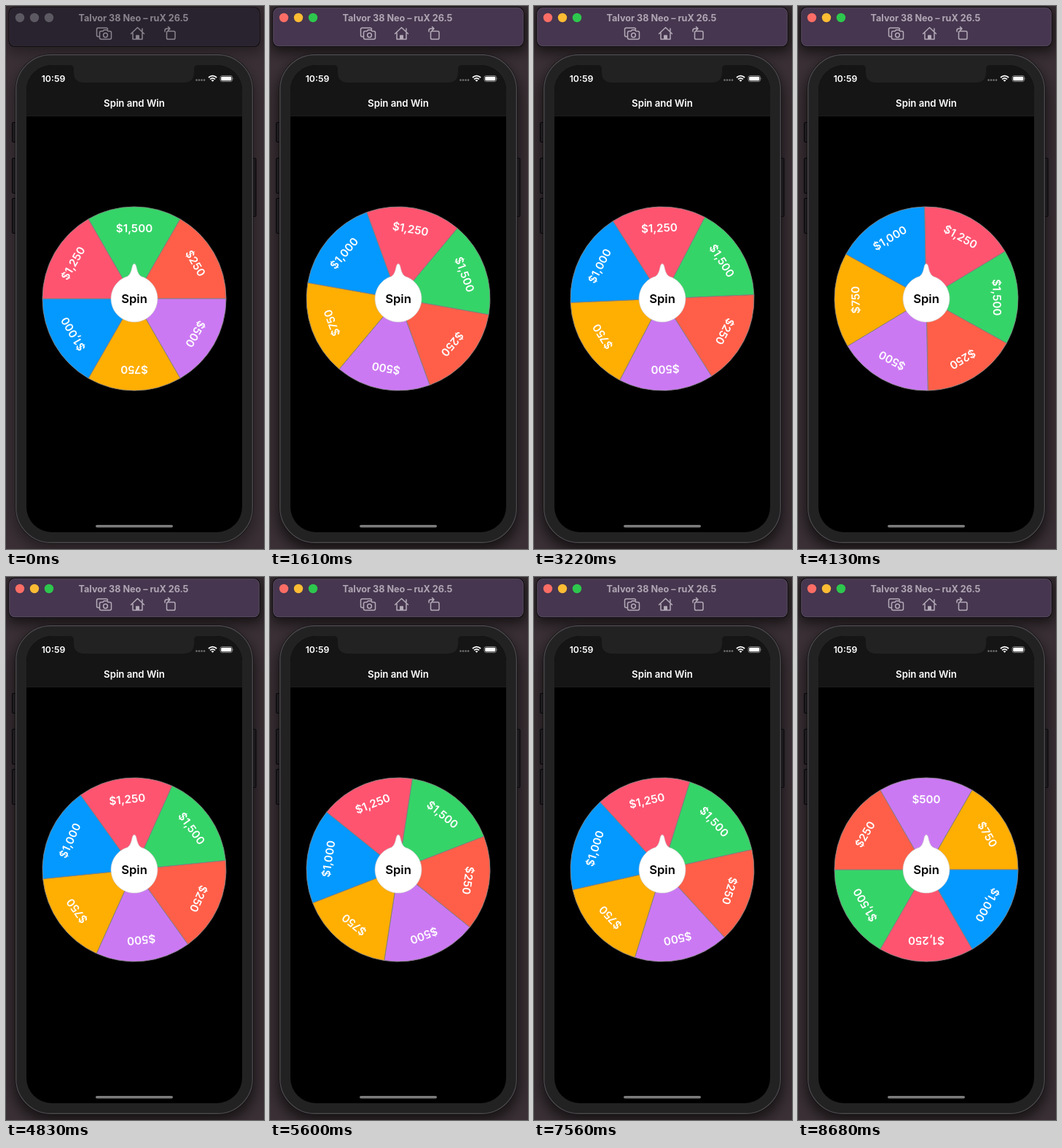
Animation, 354 px wide and 744 px high, one loop 8750 ms. Source, as an HTML page:

```html
<!DOCTYPE html>
<html lang="en">
<head>
<meta charset="utf-8">
<title>Spin and Win</title>
<style>
  html, body { margin: 0; width: 100%; height: 100%; overflow: hidden; background: #2d2529; }
  svg { display: block; width: 354px; height: 744px; font-family: Inter, Roboto, sans-serif; font-weight: 600;
        text-anchor: middle; --bar: #29232f; --edge: #39323e; --ink: #8a858e; --icon: #8a858e;
        --red: #5d5962; --amber: #5d5962; --green: #5d5962; --shade: .35; }
  svg.active { --bar: #46364f; --edge: #6b5f71; --ink: #b0a6b4; --icon: #b4abb8;
        --red: #fc6d66; --amber: #fdbc33; --green: #2dc84d; --shade: .6; }
  .bar { fill: var(--bar); stroke: var(--edge); stroke-width: .7; }
  .title { fill: var(--ink); }
  .icons { fill: none; stroke: var(--icon); stroke-width: 1.5; stroke-linejoin: round; stroke-linecap: round; }
  .shade { opacity: var(--shade); }
</style>
</head>
<body>
<svg id="stage" viewBox="0 0 354 744">
  <defs>
    <filter id="blur" x="-20%" y="-20%" width="140%" height="140%"><feGaussianBlur stdDeviation="9"/></filter>
    <clipPath id="screen"><rect x="28" y="81" width="296" height="640" rx="35"/></clipPath>
  </defs>

  <rect width="354" height="744" fill="#3a3035"/>
  <g class="shade" filter="url(#blur)">
    <rect x="2" y="2" width="350" height="62" rx="8"/>
    <rect x="10" y="74" width="332" height="672" rx="50"/>
  </g>

  <!-- simulator toolbar -->
  <rect x="3.5" y="1.5" width="345" height="54.5" rx="8" fill="#0c090d"/>
  <rect class="bar" x="4.7" y="2.7" width="342.6" height="52" rx="7"/>
  <circle cx="19" cy="16" r="6.2" fill="var(--red)"/>
  <circle cx="39" cy="16" r="6.2" fill="var(--amber)"/>
  <circle cx="59" cy="16" r="6.2" fill="var(--green)"/>
  <text class="title" x="175" y="20.8" font-size="12.6" font-weight="700">Talvor 38 Neo – ruX 26.5</text>
  <g class="icons">
    <path d="M128 42h-1.500q-2 0-2-2v-8q0-2 2-2h11q2 0 2 2"/>
    <path d="M130.500 34.500h2.500l1.500-1.800h4l1.500 1.800h2.500q2 0 2 2v7q0 2-2 2h-12q-2 0-2-2v-7q0-2 2-2z"/>
    <circle cx="136.500" cy="40" r="2.900"/>
    <path d="M171.500 38l9-8.500 9 8.500M174 36.500v9h13v-9M187 31v3"/>
    <path d="M178.800 45v-4.500h3.400v4.500z" fill="var(--icon)"/>
    <rect x="220.500" y="34.500" width="11.500" height="11" rx="1.800"/>
    <path d="M218 35v-1.500q0-2.500 2.500-2.500h4M222.500 28.500l2.500 2.500-2.500 2.500"/>
  </g>

  <!-- phone body -->
  <g fill="#1d1a1d" stroke="#060506">
    <rect x="8.500" y="159.500" width="6" height="27" rx="1.500"/>
    <rect x="8.500" y="208.500" width="6" height="48" rx="1.500"/>
    <rect x="8.500" y="263.500" width="6" height="48" rx="1.500"/>
    <rect x="337" y="208.500" width="6" height="80" rx="1.500"/>
  </g>
  <rect x="12.500" y="65.500" width="327" height="671" rx="49" fill="#0b0a0b"/>
  <rect x="13.700" y="66.700" width="324.600" height="668.600" rx="48" fill="#222223" stroke="#4a474a" stroke-width="1.400"/>

  <g clip-path="url(#screen)">
    <rect x="28" y="81" width="296" height="640"/>
    <rect x="28" y="81" width="296" height="70" fill="#151515"/>
    <rect x="28" y="150.500" width="296" height=".7" fill="#222"/>
    <path d="M87 80.500q6 .5 6 6v4q0 14.500 14.500 14.500h136q14.500 0 14.500-14.500v-4q0-5.500 6-6z" fill="#222223"/>
  </g>

  <!-- status and navigation bars -->
  <g fill="#fff">
    <text x="65" y="103.500" font-size="12.300">10:59</text>
    <text x="176" y="137.500" font-size="13.200">Spin and Win</text>
    <g fill="#737373">
      <circle cx="261.500" cy="101.500" r="1.300"/><circle cx="265" cy="101.500" r="1.300"/>
      <circle cx="268.500" cy="101.500" r="1.300"/><circle cx="272" cy="101.500" r="1.300"/>
    </g>
    <path d="M283.500 103.800l-2-2.100q2-1.600 4 0z"/>
    <g fill="none" stroke="#fff" stroke-width="1.700">
      <path d="M280 100.300q3.500-2.800 7 0M277.900 98q5.600-4.700 11.200 0"/>
    </g>
    <rect x="294" y="95.500" width="16.500" height="8" rx="2.400" fill="none" stroke="#8a8a8a" stroke-width=".9"/>
    <rect x="295.200" y="96.700" width="14.100" height="5.600" rx="1.400"/>
    <path d="M311.600 98.200q1.500 1.300 0 2.600z" fill="#8a8a8a"/>
  </g>

  <g id="wheel"></g>

  <path d="M166.500 370.500C171 368 172.300 361 173.600 355.500Q176 350.500 178.400 355.500C179.700 361 181 368 185.500 370.500
           A32 32 0 1 1 166.500 370.500Z" fill="#fff" stroke="#c4c4c4" stroke-width=".6"/>
  <text x="176" y="407.200" font-size="16.600">Spin</text>
  <rect x="123" y="711" width="106" height="3.600" rx="1.800" fill="#7c7c7c"/>
</svg>
<script>
const LOOP = 8750, STEP = 70, FOCUS_AT = 210;
const CENTER = [176, 401], RADIUS = 126;
const prizes = [
  ['$1,500', '#35d468'], ['$250', '#ff5f49'], ['$500', '#cb79f3'],
  ['$750', '#ffae02'], ['$1,000', '#0399ff'], ['$1,250', '#ff5470']
];
// Free spin as [ms, degrees], then an eased run to the winning slice.
const freeSpin = [[0, 0], [320, 0], [1610, 2590], [2380, 4127], [4130, 7649], [5190, 9777]];
const brake = { start: 5190, duration: 3450, turn: 13 * 360 + 240 };

const stage = document.getElementById('stage');
const wheel = document.getElementById('wheel');

const halfWidth = RADIUS / 2, rise = RADIUS * Math.sqrt(3) / 2;
wheel.innerHTML = prizes.map(([label, color], i) => `
  <g transform="rotate(${i * 60})">
    <path d="M0 0L${-halfWidth} ${-rise}A${RADIUS} ${RADIUS} 0 0 1 ${halfWidth} ${-rise}Z"
      fill="${color}" stroke="#808080" stroke-width=".8"/>
    <text y="-91.5" font-size="15.2" fill="#fff">${label}</text>
  </g>`).join('');

const bezier = (a, b, s) => 3 * (1 - s) ** 2 * s * a + 3 * (1 - s) * s * s * b + s ** 3;

function easeOut(x) {
  let low = 0, high = 1;
  for (let i = 0; i < 30; i++) {
    const mid = (low + high) / 2;
    if (bezier(0.0256, 0.675, mid) < x) low = mid; else high = mid;
  }
  return bezier(0.874, 1, low);
}

function angleAt(t) {
  if (t >= brake.start) {
    return brake.turn * easeOut(Math.min(1, (t - brake.start) / brake.duration));
  }
  const i = freeSpin.findIndex(([time]) => time > t);
  const [t0, a0] = freeSpin[i - 1], [t1, a1] = freeSpin[i];
  return a0 + (a1 - a0) * (t - t0) / (t1 - t0);
}

function render(t) {
  stage.classList.toggle('active', t >= FOCUS_AT);
  wheel.setAttribute('transform', `translate(${CENTER}) rotate(${angleAt(t) % 360})`);
}

const origin = performance.now();
function tick() {
  const elapsed = (performance.now() - origin) % LOOP;
  render(Math.floor(elapsed / STEP) * STEP);
  requestAnimationFrame(tick);
}
tick();
</script>
</body>
</html>
```
